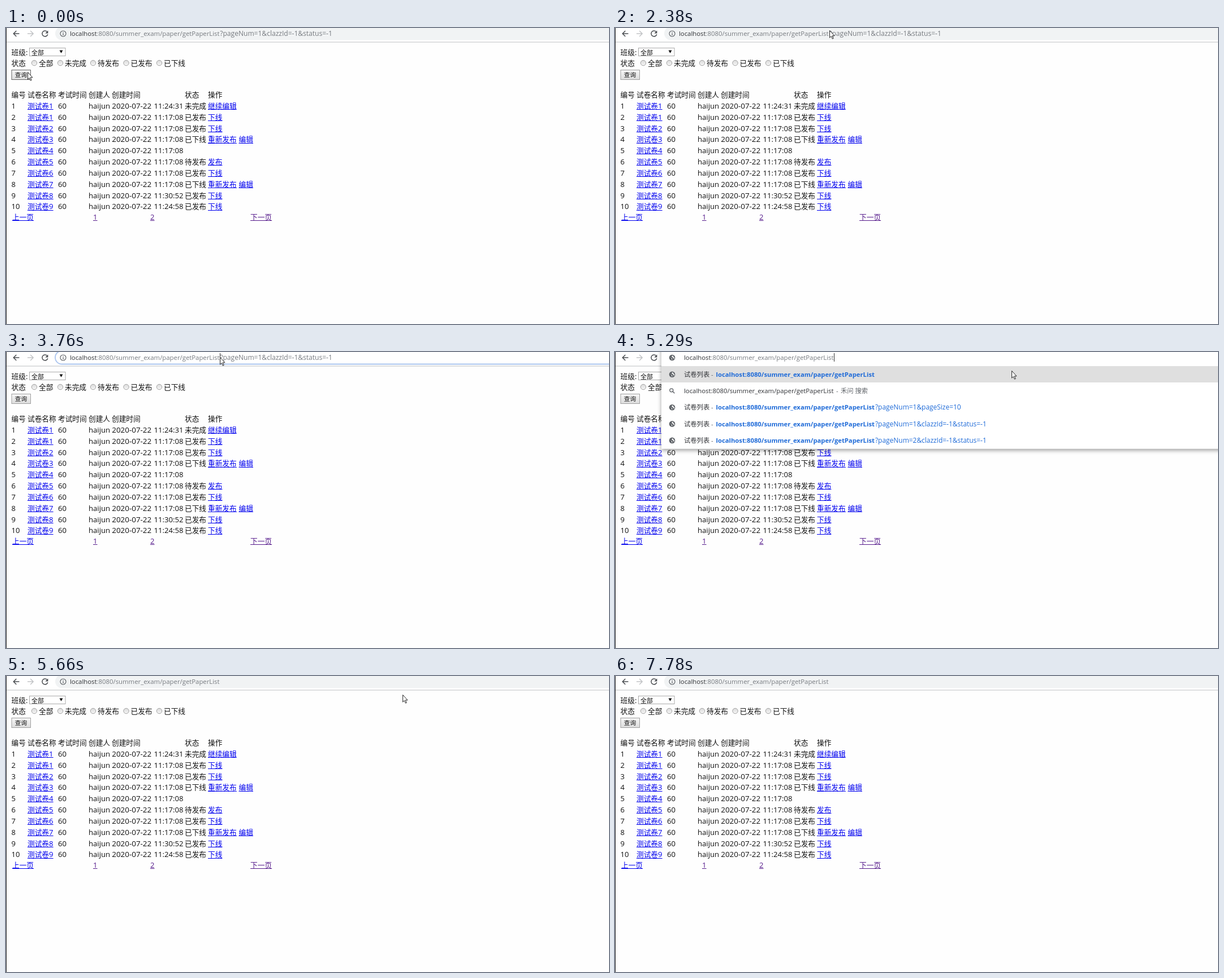
An HTML page for the animation above (8 s loop, 1066 by 525 pixels).

```html
<!DOCTYPE html>
<html lang="zh-CN">
<head>
<meta charset="utf-8">
<title>试卷列表</title>
<style>
html, body { margin: 0; width: 100%; height: 100%; overflow: hidden; background: #fefefe; }
svg { display: block; width: 1066px; height: 525px; }
text { font-family: 'Open Sans', 'Noto Sans', 'Noto Sans CJK SC', 'Noto Sans CJK', sans-serif; white-space: pre; }
</style>
</head>
<body>
<svg id="stage" viewBox="0 0 1066 525" xmlns="http://www.w3.org/2000/svg"></svg>
<script>
const LOOP = 8000;
const INK = '#111', LINK = '#0000ee', SEEN = '#551a8b', GRAY = '#5f6368', BLUE = '#1f6bd8';
const stage = document.getElementById('stage');
const $ = id => document.getElementById(id);

// Han and Latin runs have slightly different sizes
const HAN = 12.7, LATIN = 13.1;
const isHan = s => /[\u4e00-\u9fff]/.test(s);
const put = (x, y, s, size, fill, extra = '') =>
  `<text x="${x}" y="${y}" font-size="${size}" fill="${fill}" ${extra}>${s.replace(/&/g, '&amp;')}</text>`;
const label = (x, mid, s, fill = INK) => {
  const runs = s.match(/[\u4e00-\u9fff]+|[^\u4e00-\u9fff]+/g) || [];
  const spans = runs.map(r => `<tspan font-size="${isHan(r) ? HAN : LATIN}">${r}</tspan>`);
  return `<text x="${x}" y="${mid + 4.7}" fill="${fill}">${spans.join('')}</text>`;
};
const rect = (x, y, w, h, fill, extra = '') =>
  `<rect x="${x}" y="${y}" width="${w}" height="${h}" fill="${fill}" ${extra}/>`;
const link = (x, mid, s, fill = LINK) => {
  const w = [...s].reduce((sum, c) => sum + (isHan(c) ? HAN : 7.5), 0);
  return label(x, mid, s, fill) + rect(x, Math.round(mid + 5.9), w, 1, fill);
};
const group = (id, body, extra = '') => `<g id="${id}" ${extra}>${body}</g>`;

const HOST = 'localhost', PATH = ':8080/summer_exam/paper/getPaperList';
const QUERY = '?pageNum=1&clazzId=-1&status=-1';
const URL_SIZE = 11.35, QUERY_SIZE = 12.05;
const address = (x, host, path, mid = 10) =>
  `<text x="${x}" y="${mid + 4}" font-size="${URL_SIZE}" fill="${path}"><tspan fill="${host}">${HOST}</tspan>${PATH}</text>`;

function toolbar() {
  const bar = 'x="87" y="-2" width="1000" height="23.5" rx="11.7"';
  const stroke = (d, color) => `<path d="${d}" fill="none" stroke="${color}" stroke-width="1.5"/>`;
  return rect(0, 0, 1066, 25, '#fff') +
    rect(0, 24.4, 1066, 1.2, '#c9cacc') +
    `<rect ${bar} fill="#f1f3f4"/>` +
    `<rect id="focus" ${bar} fill="#fff" stroke="#a9c4ee" stroke-width="1.8"/>` +
    stroke('M23.5 10H13.5M18.3 5L13.3 10L18.3 15', '#4a4d51') +
    stroke('M38 10H48M43.2 5L48.2 10L43.2 15', '#c2c4c6') +
    stroke('M72.7 6.6A5 5 0 1 0 73.8 11.2', '#4a4d51') +
    '<path d="M74.4 4.5V9.6H69.3Z" fill="#4a4d51"/>' +
    group('info', '<circle cx="101" cy="10" r="5" fill="none" stroke="#5f6368" stroke-width="1.2"/>' +
      rect(100.4, 9.2, 1.3, 3.7, GRAY) + rect(100.4, 6.9, 1.3, 1.3, GRAY)) +
    address(113, '#303236', '#777b80') +
    group('query', put(378.3, 14, QUERY, QUERY_SIZE, '#777b80')) +
    `<clipPath id="range"><rect id="span" x="113" y="2" width="464" height="16"/></clipPath>` +
    group('picked', rect(113, 2, 464, 16, '#3297fd') + address(113, '#fff', '#fff') +
      put(378.3, 14, QUERY, QUERY_SIZE, '#fff'), 'clip-path="url(#range)"') +
    group('caret', rect(378, 2, 1, 16, '#333'));
}

function filters() {
  const radios = [[50, '全部'], [96, '未完成'], [154, '待发布'], [212.5, '已发布'], [271, '已下线']];
  return label(9.5, 43, '班级:') +
    rect(41.5, 35.5, 63.5, 14, '#fff', 'stroke="#a9a9a9"') +
    put(45, 47.8, '全部', 11, INK) +
    '<path d="M94.5 39.5H100.5L97.5 44.8Z" fill="#111"/>' +
    label(9.5, 62.5, '状态') +
    radios.map(([x, s]) =>
      `<circle cx="${x}" cy="62" r="4.7" fill="url(#knob)" stroke="#a3a3a3"/>` + label(x + 8, 62.5, s)).join('') +
    rect(10, 74.5, 33.5, 17, 'url(#face)', 'id="button" stroke="#a0a0a0"') +
    put(15.8, 87.2, '查询', 10.7, INK);
}

function papers() {
  const heads = [[9.5, '编号'], [38, '试卷名称'], [92, '考试时间'], [146, '创建人'], [187, '创建时间'], [316, '状态'], [357, '操作']];
  const acts = { 未完成: ['继续编辑'], 已发布: ['下线'], 已下线: ['重新发布', '编辑'], 待发布: ['发布'] };
  const states = ['未完成', '已发布', '已发布', '已下线', '', '待发布', '已发布', '已下线', '已发布', '已发布'];
  const clock = { 0: '24:31', 8: '30:52', 9: '24:58' };
  const rows = states.map((state, i) => {
    const y = 138.3 + i * 19.82;
    return label(9.5, y, String(i + 1)) +
      link(38, y, '测试卷' + Math.max(1, i)) +
      label(92, y, '60') +
      label(146, y, 'haijun') +
      put(187.3, y + 4.7, '2020-07-22', 13.4, INK) +
      label(261.5, y, '11:' + (clock[i] || '17:08')) +
      label(316, y, state) +
      (acts[state] || []).map((s, k) => link(357 + k * 54.5, y, s)).join('');
  });
  return heads.map(([x, s]) => label(x, 118.5, s)).join('') + rows.join('') +
    link(11, 335.5, '上一页') + link(154, 335.5, '1', SEEN) +
    link(255, 335.5, '2', SEEN) + link(432, 335.5, '下一页', SEEN);
}

function suggestions() {
  const globe = y => `<g transform="translate(101 ${y})"><circle r="5.3" fill="${GRAY}"/>` +
    '<path d="M-4 -1.5L-1.2 .6V2.6L.2 4.3V1.8L-2 -.4ZM1 -4L-1 -2.3L.6 -.6L2.4 .6L3 3L4.2 .3L2.4 -1.6Z" fill="#fff"/></g>';
  const tails = ['', null, '?pageNum=1&pageSize=10', QUERY, QUERY.replace('1', '2')];
  const rows = tails.map((tail, i) => {
    const y = 39.7 + i * 29.3;
    if (tail === null) {
      return `<circle cx="99.8" cy="${y - 1.2}" r="3" fill="none" stroke="${GRAY}" stroke-width="1.3"/>` +
        `<path d="M102 ${y + 1}L105.3 ${y + 4.3}" stroke="${GRAY}" stroke-width="1.5"/>` +
        address(122, '#303236', '#303236', y) + put(391, y + 4, '-', 11.3, GRAY) +
        put(399, y + 4, '禾问 搜索', 11.3, GRAY);
    }
    return globe(y) + put(122, y + 4, '试卷列表', 11.3, '#303236') + put(170, y + 4, '-', 11.3, GRAY) +
      put(178.5, y + 4, HOST + PATH, 11.28, BLUE, 'font-weight="700"') +
      put(460, y + 4, tail, 11.95, BLUE);
  });
  return rect(82, -20, 1100, 191.5, '#fff', 'filter="url(#shade)"') +
    rect(82, 25, 984, 29, '#dfdfdf') + globe(10) +
    address(122, '#303236', '#777b80') + rect(387, 2, 1, 15, '#333') + rows.join('');
}

stage.innerHTML = `<defs>
  <linearGradient id="face" x2="0" y2="1"><stop stop-color="#f7f7f7"/><stop offset="1" stop-color="#dcdcdc"/></linearGradient>
  <linearGradient id="knob" x2="0" y2="1"><stop stop-color="#dadada"/><stop offset="1" stop-color="#f6f6f6"/></linearGradient>
  <filter id="shade" x="-5%" y="-10%" width="110%" height="125%"><feDropShadow dx="0" dy="3" stdDeviation="3.5" flood-opacity=".38"/></filter>
  </defs>` +
  rect(0, 0, 1066, 525, '#fefefe') + filters() + papers() + toolbar() +
  group('menu', suggestions()) + rect(0, 0, 1, 525, '#222') +
  group('arrow', '<path d="M.5 .5V13.2L3.3 10.5L5.3 15.2L7.2 14.4L5.2 9.8H9Z" fill="#fff" stroke="#111" stroke-width=".9"/>') +
  group('beam', '<path d="M336 137.5H340M338.2 138V145M336 145.5H340" fill="none" stroke="#777" stroke-width="1" stroke-dasharray="1.5 .8"/>');

// Pointer moves: first step, last step, one place per step
const MOVES = [
  [280, 410, [[37, 78], [36, 78]]],
  [690, 1680, [[62, 70], [250, 50], [480, 34], [625, 26], [480, 21], [354, 19], [349, 11], [346, 6]]],
  [1830, 2380, [[350, 6], [357, 5], [366, 5], [374, 4], [379, 4]]],
  [2660, 3330, [[384, 11], [383, 11], [382, 10], [381, 9], [381, 9], [380, 9]]],
  [3600, 3760, [[379, 9], [378, 9]]],
  [4030, 4430, [[440, 12], [560, 20], [660, 29], [701, 33]]],
  [5970, 6960, [[560, 60], [340, 110], [180, 145], [97, 166], [68, 190], [47, 208], [52, 172], [60, 141]]],
  [7080, 7780, [[130, 140], [240, 141], [340, 139], [398, 140], [366, 137], [334, 132]]]
];

function pointer(t) {
  let place = [38, 78];
  for (const [from, to, path] of MOVES) {
    if (t < from) break;
    const step = (to - from) / (path.length - 1);
    place = path[Math.min(path.length - 1, Math.floor((t - from) / step + .1))];
  }
  return place;
}

function render(t) {
  const [x, y] = pointer(t);
  const within = (a, b) => t >= a && t < b;
  const show = (id, on) => $(id).setAttribute('display', on ? 'inline' : 'none');
  const all = within(2660, 3060), part = within(4030, 5290);
  const start = all ? 113 : 378;
  const end = all ? 577 : Math.min(577, Math.max(378, x));
  $('span').setAttribute('x', start);
  $('span').setAttribute('width', end - start);
  show('picked', all || part);
  show('focus', within(2660, 5660));
  show('query', t < 5290);
  show('caret', within(3060, 4030));
  show('menu', within(5290, 5660));
  show('beam', t >= 7780);
  show('arrow', t < 7780);
  $('arrow').setAttribute('transform', `translate(${x} ${y})`);
  $('button').setAttribute('stroke', t < 690 ? '#666' : '#a0a0a0');
}

function tick() {
  render(performance.now() % LOOP);
  requestAnimationFrame(tick);
}
tick();
</script>
</body>
</html>
```
